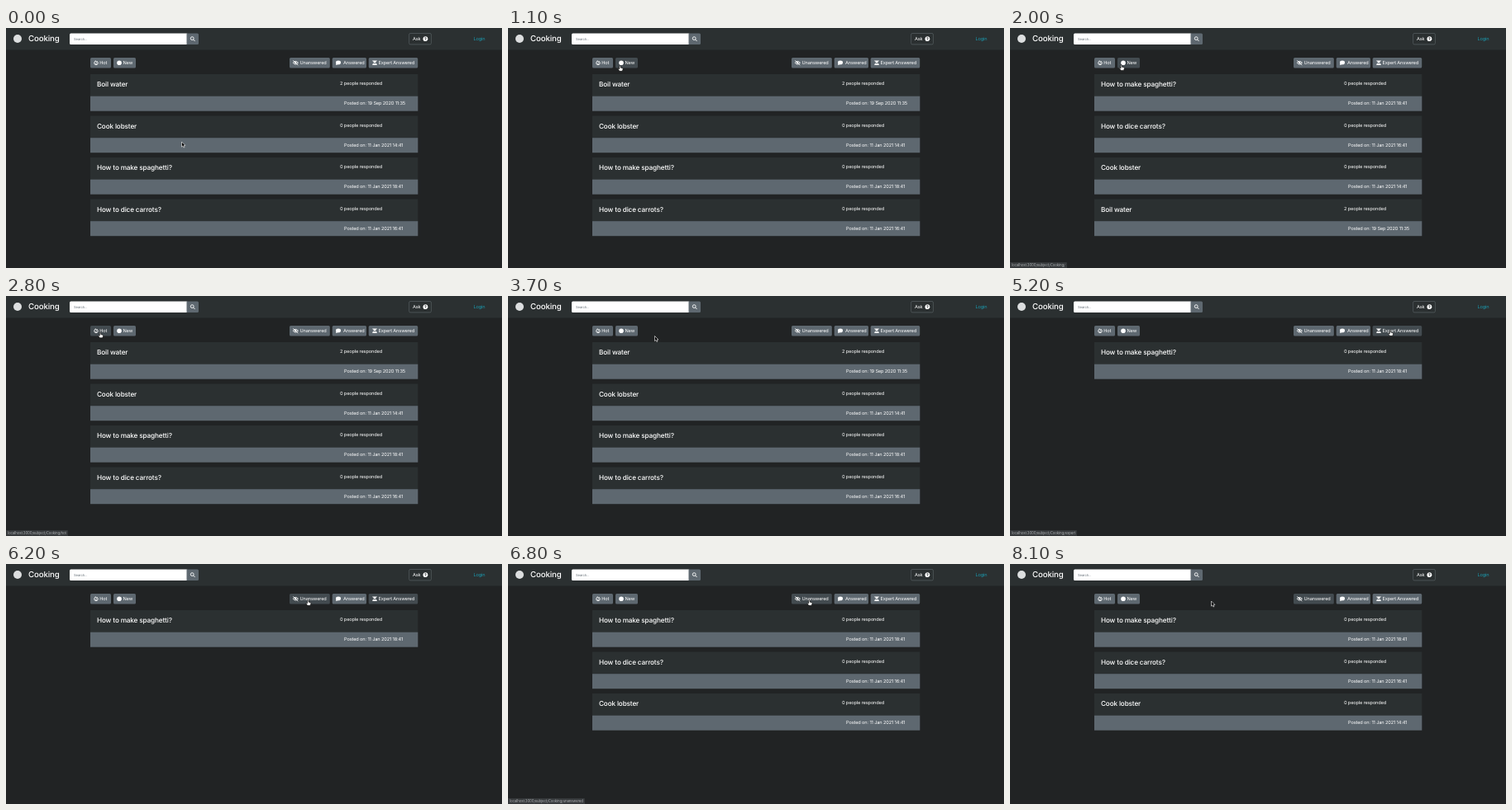
Write an HTML page that moves like this. It is 600 by 291 pixels and loops after 8400 ms.

```html
<!DOCTYPE html>
<html lang="en">
<head>
<meta charset="utf-8">
<title>Cooking</title>
<style>
  html, body { margin: 0; width: 100%; height: 100%; overflow: hidden; background: #212324; }
  body { position: relative; font: 5.65px Inter, "Open Sans", sans-serif; letter-spacing: -.025em; }
  svg { display: block; width: 600px; height: 291px; text-rendering: geometricPrecision; }
  text { fill: #fff; }
  .brand { font-size: 9.7px; font-weight: 500; }
  .title { font-size: 8.2px; font-weight: 500; }
  .nav, .head { fill: #2b3031; }
  .foot, .btn rect { fill: #5e6870; }
  .btn.dark rect { fill: #434b50; }
  .btn.ring rect { stroke: #4b5358; stroke-width: 2; paint-order: stroke; }
  .icon { fill: #fff; }
  .line { fill: none; stroke: #fff; stroke-width: .9; }
  #status { position: absolute; left: 0; bottom: 0; height: 7px; padding: 0 2px; font-size: 4.45px;
    line-height: 7px; white-space: nowrap; color: #a9adaf; background: #36393b; border-top-right-radius: 1px; }
</style>
</head>
<body>
<svg viewBox="0 0 600 291">
  <rect class="nav" width="600" height="26.5"/>
  <circle cx="14" cy="13" r="5" fill="#dcdedf"/>
  <text class="brand" x="27" y="16.3">Cooking</text>
  <rect x="77" y="6.5" width="143" height="13.5" rx="1.5" fill="#fff"/>
  <text x="82" y="15.2" style="font-size:4.2px;fill:#6c757d">Search...</text>
  <path class="foot" d="M218.5 6.5h13q1.5 0 1.5 1.5v10.5q0 1.5-1.5 1.5h-13z"/>
  <circle class="line" cx="225.2" cy="12.6" r="1.9"/>
  <path class="line" d="M226.6 14l2 2"/>
  <rect x="487.6" y="6.5" width="26.8" height="13.4" rx="1.5" fill="none" stroke="#586064" stroke-width=".7"/>
  <text x="492" y="15.4">Ask</text>
  <circle class="icon" cx="507.4" cy="13.2" r="2.9"/>
  <text x="506" y="15.1" style="font-size:5px;font-weight:700;fill:#2b3031">?</text>
  <text x="565.5" y="15.4" style="fill:#1a9bb0">Login</text>
  <g id="buttons"></g>
  <g id="rows"></g>
  <path id="arrow" d="M0 0V6.1L1.4 4.9 2.4 7 3.5 6.5 2.6 4.4H4.4Z" fill="#000" stroke="#fff" stroke-width=".6"/>
  <path id="hand" d="M-.7 .5Q0-.4 .7 .5V2.6L3 3.2Q3.8 3.5 3.6 4.4L2.8 6.8H-.6L-2.4 4.3Q-2.5 3.3-.7 4.2Z"
    fill="#fff" stroke="#000" stroke-width=".6"/>
</svg>
<div id="status"></div>
<script>
const $ = id => document.getElementById(id);
const LOOP = 8400, STEP = 100;

// Icons are drawn around their own centre.
const icons = {
  flame: '<path class="line" d="M-.7-2.5Q-3 0-2 1.5Q0 3.6 2 1.5Q2.8-.2 1.2-1.8L.5-.7Z"/><circle class="icon" cy="1" r=".7"/>',
  dot: '<circle class="icon" r="2.8"/>',
  eye: '<path class="line" d="M-3.1 0Q0-3.6 3.1 0Q0 3.6-3.1 0ZM-3-2.7L3 2.7"/><circle class="icon" r="1.1"/>',
  bubble: '<ellipse class="icon" cy="-.3" rx="3" ry="2.4"/><path class="icon" d="M-2.4 .5L-3 2.8L0 1.8Z"/>',
  expert: '<path class="icon" d="M-2.8-2.8H2.8V-2H1.7Q1.7 .3 0 .3T-1.7-2H-2.8ZM-2.8 2.8Q-2.7 .6-1 .5L0 1.5L1 .5Q2.7 .6 2.8 2.8Z"/>'
};

// label, left, width, icon centre, text left, icon
const buttons = [
  ['Hot', 102, 25, 109, 113.3, 'flame'],
  ['New', 130, 27, 137, 141.5, 'dot'],
  ['Unanswered', 343, 48.8, 350.3, 355.5, 'eye'],
  ['Answered', 394.7, 41.3, 402, 408, 'bubble'],
  ['Expert Answered', 438.7, 59.5, 446, 450.5, 'expert']
];
const [HOT, NEW, UNANSWERED, , EXPERT] = buttons.keys();

$('buttons').innerHTML = buttons.map(([label, x, w, iconX, textX, icon]) => `<g class="btn">
  <rect x="${x}" y="36" width="${w}" height="12.4" rx="1.5"/>
  <g transform="translate(${iconX} 42.2)">${icons[icon]}</g>
  <text x="${textX}" y="44.2">${label}</text></g>`).join('');

const boil = ['Boil water', 2, '19 Sep 2020 11:35'];
const lobster = ['Cook lobster', 0, '11 Jan 2021 14:41'];
const spaghetti = ['How to make spaghetti?', 0, '11 Jan 2021 18:41'];
const carrots = ['How to dice carrots?', 0, '11 Jan 2021 16:41'];
const hottest = [boil, lobster, spaghetti, carrots];

const lists = [
  [0, hottest],
  [1500, [spaghetti, carrots, lobster, boil]],
  [2700, hottest],
  [5000, [spaghetti]],
  [6600, [spaghetti, carrots, lobster]]
];
const focus = [[0, -1], [1400, NEW], [2600, HOT], [3500, -1], [4800, EXPERT], [6500, UNANSWERED]];
const links = [[0, null], [1300, ''], [2300, 'hot'], [3100, null], [4600, 'expert'],
  [5500, null], [6300, 'unanswered'], [7300, null]];
const path = [
  [100, 212.5, 138], [600, 127, 56], [700, 127, 56], [900, 121, 55], [1100, 135.5, 45.5],
  [1700, 135.5, 45.5], [2000, 134.8, 44.6], [2400, 114, 44], [2900, 114, 44], [3200, 150, 48.8],
  [3500, 150, 48.8], [3700, 177.5, 48.5], [4300, 448, 48.8], [4600, 460, 41.5], [5200, 460, 41.5],
  [5700, 405, 52], [6100, 367, 49.5], [6200, 365.3, 43.5], [6900, 364.3, 43.5], [7600, 243.5, 45], [LOOP, 243.5, 45]
];

const latest = (table, t) => table.findLast(entry => entry[0] <= t);

function cursorAt(t) {
  const i = path.findIndex(p => p[0] > t);
  if (i <= 0) return path.at(i).slice(1);
  const [t0, x0, y0] = path[i - 1], [t1, x1, y1] = path[i];
  const k = (t - t0) / (t1 - t0);
  return [x0 + (x1 - x0) * k, y0 + (y1 - y0) * k];
}

const row = ([title, count, date], i) => `<g transform="translate(102 ${56 + i * 50.5})">
  <rect class="head" width="396.3" height="27"/>
  <rect class="foot" y="26.7" width="396.3" height="18"/>
  <text class="title" x="8" y="15">${title}</text>
  <text x="302" y="13.2">${count} people responded</text>
  <text x="307" y="37.1">Posted on: ${date}</text></g>`;

function draw(t) {
  const [x, y] = cursorAt(t);
  const [since, focused] = latest(focus, t);
  const over = buttons.findIndex(([, left, w]) => x >= left && x <= left + w && y >= 36 && y <= 48);
  [...$('buttons').children].forEach((b, i) => {
    b.classList.toggle('dark', i === over || i === focused);
    b.classList.toggle('ring', i === focused && t < since + 200);
  });

  $('rows').innerHTML = latest(lists, t)[1].map(row).join('');

  const link = latest(links, t)[1];
  $('status').hidden = link === null;
  $('status').textContent = 'localhost:3000/subject/Cooking/' + (link ?? '');

  for (const id of ['arrow', 'hand']) {
    $(id).setAttribute('transform', `translate(${x} ${y})`);
    $(id).style.display = (id === 'hand') === (over >= 0) ? '' : 'none';
  }
}

const start = performance.now();
let shown = -1;
function tick() {
  const t = Math.floor((performance.now() - start) % LOOP / STEP) * STEP;
  if (t !== shown) draw(shown = t);
  requestAnimationFrame(tick);
}
tick();
</script>
</body>
</html>
```
